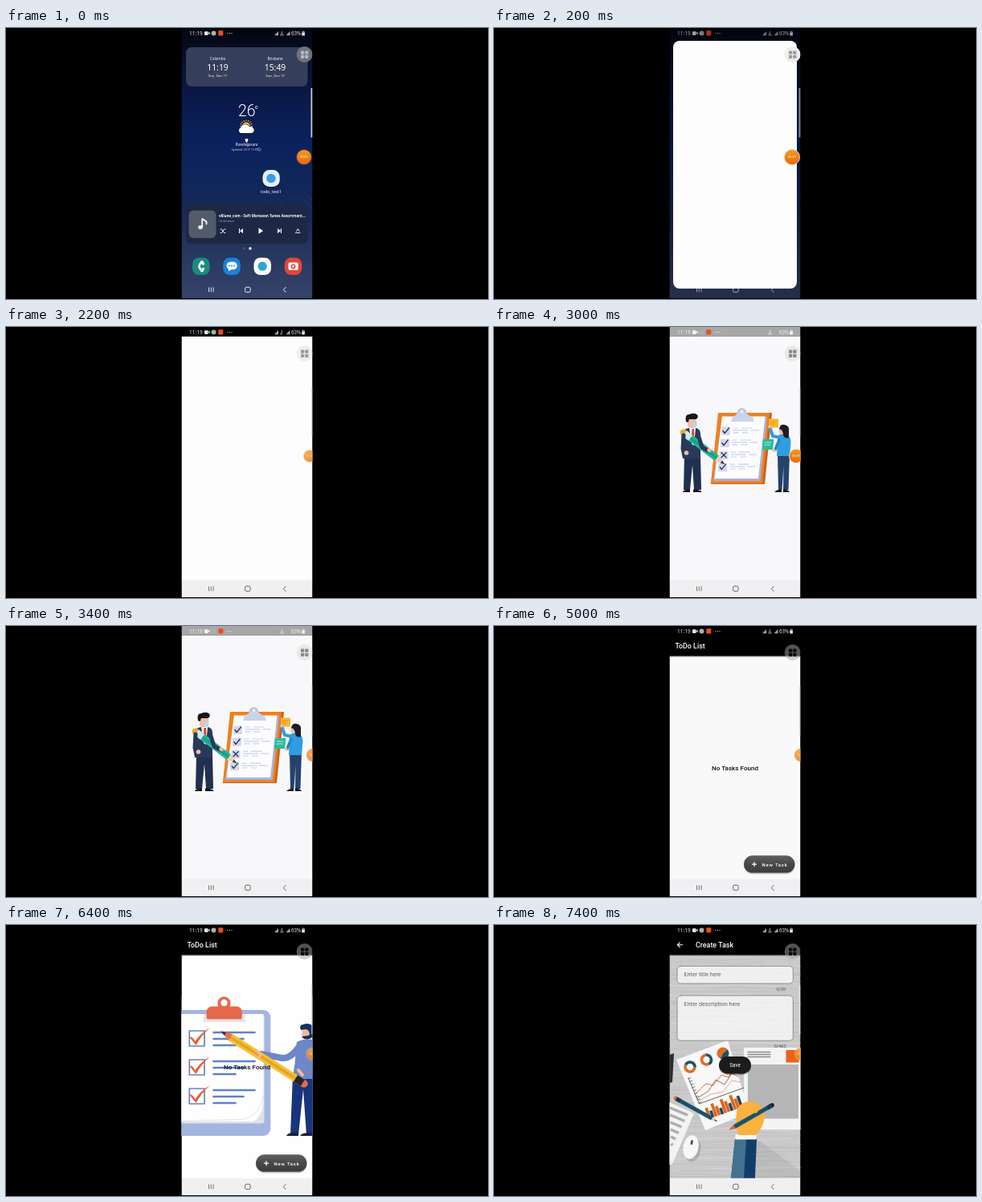
An HTML page with a canvas for the animation above (8000 ms loop, 600 px wide and 338 px high).

```html
<!DOCTYPE html>
<html lang="en">
<head>
<meta charset="utf-8">
<title>Todo app demo</title>
<style>
html, body { margin: 0; height: 100%; overflow: hidden; background: #000; }
canvas { display: block; width: 600px; height: 338px; }
</style>
</head>
<body>
<canvas id="stage"></canvas>
<script>
const canvas = document.getElementById('stage');
const dpr = window.devicePixelRatio || 1;
canvas.width = 600 * dpr;
canvas.height = 338 * dpr;
const c = canvas.getContext('2d');
const LEFT = 218.5, WIDTH = 163;

// Drawing helpers
function box(x, y, w, h, fill, r = 0, stroke, lw = 1) {
  c.beginPath();
  c.roundRect(x, y, w, h, r);
  if (fill) { c.fillStyle = fill; c.fill(); }
  if (stroke) { c.strokeStyle = stroke; c.lineWidth = lw; c.stroke(); }
}
function oval(x, y, rx, fill, ry = rx) {
  c.beginPath();
  c.ellipse(x, y, rx, ry, 0, 0, 7);
  c.fillStyle = fill;
  c.fill();
}
function shape(d, fill) { c.fillStyle = fill; c.fill(new Path2D(d)); }
function line(d, color, lw = 1, cap = 'round') {
  c.strokeStyle = color;
  c.lineWidth = lw;
  c.lineCap = cap;
  c.lineJoin = 'round';
  c.stroke(new Path2D(d));
}
function text(s, x, y, size, color = '#fff', { align = 'left', weight = 400, font = 'Roboto', gap = 0 } = {}) {
  c.font = `${weight} ${size}px ${font}, sans-serif`;
  c.textAlign = align;
  c.letterSpacing = gap + 'px';
  c.fillStyle = color;
  c.fillText(s, x, y);
}
function label(s, x, y, size, color, weight = 500) {
  text(s, x, y, size, color, { align: 'center', weight, font: 'Noto Sans' });
}
function vertical(y1, y2, ...colors) {
  const g = c.createLinearGradient(0, y1, 0, y2);
  colors.forEach((color, i) => g.addColorStop(i / (colors.length - 1), color));
  return g;
}
function at(x, y, angle, draw) {
  c.save();
  c.translate(x, y);
  c.rotate(angle);
  draw();
  c.restore();
}
// Tip at (x1, y1), blunt end at (x2, y2)
function pencil(x1, y1, x2, y2, w, body, cone, lead, end, band) {
  const len = Math.hypot(x2 - x1, y2 - y1), h = w / 2, n = w * 1.5;
  at(x1, y1, Math.atan2(y2 - y1, x2 - x1), () => {
    box(len - w, -h, w, w, end, [0, h, h, 0]);
    box(n, -h, len - n - w * .7, w, body);
    box(n, -h * .35, len - n - w * 1.8, h * .7, 'rgba(0,0,0,.13)');
    box(len - w * 1.8, -h, w * 1.1, w, band);
    shape(`M0 0L${n} ${-h}V${h}Z`, cone);
    shape(`M0 0L${n * .45} ${-h * .45}V${h * .45}Z`, lead);
  });
}

function statusBar(color, back, dimArrow) {
  if (back) box(LEFT, 0, WIDTH, 11.7, back);
  text('11:19', 228, 9, 6.5, color, { font: 'Noto Sans' });
  box(247, 4.2, 4.6, 4.7, color, 1);
  shape('M251.500 6.500L253.600 4.500V8.500Z', color);
  oval(258.5, 6.4, 3, '#a9b2ad');
  box(264.3, 3.3, 6, 6.2, '#ee4d1c', 1);
  [276, 278.5, 281].forEach(x => oval(x, 6.6, .6, color));
  [334, 348.5].forEach(x => shape(`M${x} 9.300L${x + 5} 4V9.300Z`, '#a2a2a2'));
  label('4', 343.5, 6.6, 4, color);
  line('M342.500 7.500V9.500', color, .8);
  line('M344.700 7.500V9.500', dimArrow ? '#555' : color, .8);
  text('63%', 355, 9, 6.2, color, { font: 'Noto Sans' });
  box(368.3, 5.6, 3.6, 4, color, .6);
  line('M369 5.600V4.200H371.200V5.600', color, .7);
}
function navBar(color, back) {
  if (back) box(LEFT, 315.7, WIDTH, 21.5, back);
  [252.5, 255.3, 258.1].forEach(x => line(`M${x} 323.500V329.300`, color, .9, 'butt'));
  box(297.6, 323.2, 6.6, 6.4, null, 2, color, 1);
  line('M348.200 323.500L345.300 326.500L348.200 329.500', color, 1);
}
function assist(back, squares) {
  oval(371.6, 33, 10, back);
  for (const x of [367, 372.2]) for (const y of [28.5, 33.7]) box(x, y, 4.2, 4.2, squares, .8);
}
function recorder(x, r, { alpha = 1, ring = '#ffd9a0' } = {}) {
  c.globalAlpha = alpha;
  oval(x, 161, r, ring);
  oval(x, 161, r - .8, vertical(152, 171, '#f29a24', '#e76612'));
  label('00:01', x, 162.4, 3.7, '#fbe3a0', 600);
  c.globalAlpha = 1;
}
function edgeHandle(color, w = 1.2) { box(381.5 - w, 75, w, 61.5, color, .6); }

function home() {
  box(LEFT, 0, WIDTH, 337, vertical(0, 337, '#03050f', '#0a1232', '#0a1a4c', '#0b215e', '#10265a', '#1a2c56', '#2a3961', '#36436a'));
  for (let i = 0; i < 45; i++) {
    const x = 381 - (i * 37.7 % 62), y = 207 + (i * 23.3 % 17) + (381 - x) * .1;
    box(x, y, .7, .7, 'rgba(150,165,170,.45)');
  }
  box(224, 24, 151.5, 49, '#353e5a', 7);
  for (const [city, time, x] of [['Colombo', '11:19', 263.5], ['Brisbane', '15:49', 335]]) {
    label(city, x, 39.7, 4.6);
    label(time, x, 52.7, 10.4);
    label('Sun, Dec 17', x, 61, 4.3);
  }
  text('26', 289, 110, 19.5, '#fff', { weight: 300 });
  text('°', 309, 108, 14, '#fff', { weight: 300 });
  for (let i = 0; i < 9; i++) at(299, 122.5, Math.PI * (1 + i / 8), () => line('M6.500 0H7.500', '#ffb52e', 1.1));
  oval(299, 122.5, 5, '#ffb020');
  const cloud = 'M292 131A3.600 3.600 0 0 1 292 124.500A6 6 0 0 1 303 123.500A4 4 0 0 1 306 131Z';
  line(cloud, '#0b1f58', 1.2);
  shape(cloud, '#fff');
  shape('M299.500 143.500C296.500 139.500 297.500 138 299.500 138S302.500 139.500 299.500 143.500Z', '#fff');
  label('Ruvelagasara', 299.5, 147.4, 4.4);
  label('Updated 12/17 11:01', 297, 153, 3.4, '#d5d9e6');
  line('M317 150.500A1.800 1.800 0 1 1 315.500 149.500', '#dde', .6);

  box(319.5, 177, 21.3, 21, '#e4f0fa', 8.5);
  oval(330, 187.5, 5.8, '#3f9ce0');
  label('todo_test1', 330, 205.8, 5.2);

  box(224, 220, 151.5, 49, '#1d2845', 6);
  box(227.5, 227.5, 34, 34.5, '#535b6b', 6);
  oval(242, 248.6, 2.8, '#fff', 2.4);
  line('M244.200 248.500V238L249.500 241.500V244.500', '#fff', 1.7);
  text('v8lune_com - Soft Monsoon Tunes Assortment…', 265, 235.8, 4.55, '#fff', { weight: 600, font: 'Noto Sans' });
  text('Unknown', 265, 241.5, 4.3, '#9ba5b8', { font: 'Noto Sans' });
  line('M267 251H268.500L271.500 255.500H273M267 255.500H268.500L271.500 251H273', '#fff', .9);
  shape('M295 250V256L291 253Z M290 250H291V256H290Z', '#fff');
  shape('M314.500 249.300L320 253L314.500 256.700Z', '#fff');
  shape('M338 250V256L342 253Z M342 250H343V256H342Z', '#fff');
  line('M360.500 255.500H366M361.500 253.500L363.300 250.500L365 253.500', '#fff', .9);

  oval(296, 275, 1.4, '#46557a');
  oval(304, 275, 1.7, '#fff');
  [[232, '#188c7b'], [270.3, '#1b82d6'], [308.5, '#fafafa'], [346.8, '#e0473a']]
    .forEach(([x, color]) => box(x, 286.5, 21.5, 21.5, color, 8));
  line('M244.500 291.500Q236.500 297 244.500 303', '#fff', 2.6);
  line('M243.500 292L245.500 294M243.500 302.500L245.500 300.500', '#fff', 3.2);
  box(274.6, 291.8, 13, 9.4, '#fff', 4.5);
  shape('M277 299V303.500L281.500 300.500Z', '#fff');
  [278, 281, 284].forEach(x => oval(x, 296.6, 1, '#1b82d6'));
  oval(319.2, 297.2, 5.6, '#2ba7c9');
  box(351.5, 292.5, 12.3, 9.6, '#fff', 2);
  oval(357.5, 297.4, 3, '#e0473a');
  oval(357.5, 297.4, 1.4, '#fff');

  statusBar('#e6e6e6');
  navBar('#f2f4f8');
  edgeHandle('#c5cad8', 2);
  assist('#6d737e', '#b3b8bf');
}

function blank(dimArrow) {
  box(LEFT, 11.5, WIDTH, 305, '#fdfdfd');
  statusBar('#e6e6e6', '#000', dimArrow);
  navBar('#666', '#f0eff1');
  edgeHandle('#cfcfcf');
  assist('#eeeeee', '#9b9b9b');
}

function opening() {
  home();
  box(LEFT, 0, WIDTH, 337, 'rgba(0,0,0,.3)');
  box(223, 16, 154, 309, '#fdfdfd', 8);
  assist('#eeeeee', '#9b9b9b');
}

function splash() {
  box(LEFT, 11.5, WIDTH, 305, '#f8f8fa');
  // Clipboard
  shape('M280 107H346L337 196H270Z', '#c8641a');
  shape('M279 107H343L334 195H270Z', '#f1801f');
  shape('M284 112H340L331.500 192H273Z', '#a9b1dd');
  shape('M284 111.500H337.500L329 189H274.500Z', '#fdfdff');
  oval(308.5, 107, 6, '#bcc8df');
  shape('M295 118L297 112Q302 110 303 107H314Q315 110 322 112L324 118Z', '#c9d4e8');
  oval(308.5, 105.5, 2, '#eef2fa');
  [[288.5, 129.5], [287.3, 144.5], [286, 159.7], [284.6, 174.7]].forEach(([x, y], i) => {
    box(x - 5.5, y - 5, 11, 10.5, '#d3d9ec', 1);
    line(i === 2 ? `M${x - 3} ${y - 3}L${x + 3} ${y + 3}M${x + 3} ${y - 3}L${x - 3} ${y + 3}`
      : `M${x - 3.5} ${y}L${x - 1.3} ${y + 3}L${x + 4} ${y - 3.5}`, '#29345f', 1.3);
    line(`M${x + 9} ${y - 3.5}h6m4 0h14M${x + 9} ${y - .6}h19m3 0h10M${x + 9} ${y + 2.3}h7m4 0h8`, '#c9d0ea', 1.2, 'butt');
  });
  // Man with pencil
  shape('M237 160H257L258 203H249L247 172L244 203H236Z', '#20304f');
  shape('M235 206Q236 202 244 202.500V206ZM248 206V202.500Q256 202 259 206Z', '#15181f');
  shape('M234 133Q236 127 243 126H251Q257 127 257 133V164H235L233 154Z', '#283959');
  shape('M243 126H251L249 148L246 146Z', '#fff');
  shape('M246.500 127H249L249.500 140L247.500 143L245.500 140Z', '#e2402f');
  box(241, 112, 11, 14, '#f4bd99', 4);
  shape('M244.500 118.500L252.500 118V123Q250 127 246 125Z', '#c6cedf');
  shape('M239 118Q237 109 243 109Q250 106 253.500 110Q254.500 114 251 115L243 115L241.500 119Z', '#131722');
  pencil(287.5, 171.5, 232.5, 129, 8.5, '#21b49b', '#f5cfa2', '#29345f', '#f2a534', '#d7e6e8');
  line('M236 135L235 152L238 157', '#283959', 5);
  line('M254 134L259 150L266 154', '#283959', 5);
  oval(239.5, 157, 2.8, '#f4bd99');
  oval(268, 153.5, 2.6, '#f4bd99');
  // Woman with notes
  box(342, 114.5, 12, 11, '#fbb52c');
  line('M344.500 118H351M344.500 121H349', '#e29417', .8);
  shape('M335 140H348.500L347 153H334Z', '#28bca0');
  line('M337 144H345M337 147H344', '#bff0e3', .9);
  shape('M353 158H368L366.500 203H360L360.500 173L358.500 203H354Z', '#24426c');
  shape('M349 206Q352 202.500 358 202.500V206ZM360 206V202.500Q366 202 368 206Z', '#15181f');
  line('M357 138L347 136L343.500 126', '#2f9de0', 4);
  oval(343, 124.5, 2, '#f4bd99');
  shape('M353 138Q354 133 361 133Q369 134 369.500 143L368 161H352Z', '#2f9de0');
  line('M355 141L350 153', '#2585c4', 3.5);
  oval(348.5, 154, 2, '#f4bd99');
  oval(358.5, 129, 4, '#f4bd99', 5);
  shape('M355 127Q356 121 362 122Q368 123 367 130L367 138Q362 140 360 135Q360 128 355 127Z', '#1a1d29');

  statusBar('#f4f4f4', '#a7a7a7');
  navBar('#666', '#f0eff1');
  edgeHandle('#dcdcdc');
  assist('#e9e9e9', '#8a8a8a');
}

function appBar(title, x) {
  box(LEFT, 37.5, WIDTH, 2, vertical(37.5, 39.5, 'rgba(0,0,0,.4)', 'rgba(0,0,0,0)'));
  box(LEFT, 0, WIDTH, 37.6, '#000');
  text(title, x, 28, 8.9, '#fff', { weight: 500 });
}

function clipboardArt() {
  box(LEFT, 89, WIDTH, 175, '#fefefe');
  box(208, 106, 121.3, 157, '#a4b5e0', 9);
  box(208, 111, 113.5, 136.5, '#dfe2ea', 3);
  shape('M208 111H318Q320.500 111 320.500 114V205Q322 238 308 245H208Z', '#fefefe');
  line('M320.500 212Q318 236 296 242.500L218 244.500', '#d9dce5', .8);
  box(246, 111, 51.5, 10, '#dfe3ec');
  c.beginPath();
  c.arc(271.5, 97.5, 8.2, 0, 7);
  c.roundRect(249.5, 101.5, 44.3, 16, [7, 7, 2, 2]);
  c.fillStyle = '#e7694b';
  c.fill();
  oval(271.5, 97, 4.3, '#fff');
  for (const y of [132, 168, 204]) {
    box(228.3, y, 18.7, 19, null, 0, '#6384c4', 1.7);
    shape(`M228.500 ${y + 8}Q231 ${y + 6} 235.500 ${y + 13}Q242 ${y + 3} 254 ${y - 4}Q243 ${y + 6} 236.500 ${y + 18}Z`, '#e6603c');
    [53, 39, 29].forEach((w, i) => line(`M258.500 ${y + 2 + i * 8}h${w - 2}`, '#6080c9', 2.6));
  }
  // Man holding the pencil
  shape('M357 187H382V262H374L370 205L364 262H354Z', '#17357b');
  shape('M349 263Q351 259 356 259.500L364 259V263ZM366 263Q369 259 374 259.500H382V263Z', '#18203c');
  shape('M362 146Q370 141 382 143V192H356Q361 170 360 160Z', '#6c88ca');
  line('M366 150Q355 167 344 166L318 161', '#6c88ca', 8);
  oval(374.5, 135, 6.5, '#f6b79b', 8);
  shape('M367 131Q364 125 370 124Q377 121 382 126V142L378 137Q378 131 373 130Z', '#182f63');
  shape('M368 139Q372 145 380 141V135L376 138Z', '#182f63');
  pencil(267.5, 132.5, 375, 200.5, 9.5, '#fbbf2f', '#e8704c', '#3a3030', '#e8694a', '#22232d');
  line('M311 157L317 161L315 166', '#f6b79b', 3.2);
  line('M364 181L369 187', '#f6b79b', 4);
}

function todoList(withArt, dimArrow) {
  box(LEFT, 37, WIDTH, 279, withArt ? '#fefefe' : '#f9f9fa');
  if (withArt) clipboardArt();
  text('No Tasks Found', 300, 179.5, 8.1, '#111', { align: 'center', weight: 500 });
  box(311, 288, 63.5, 21.5, 'rgba(0,0,0,.22)', 11);
  box(311, 286.3, 63.5, 21.5, vertical(286, 308, '#626262', '#484848', '#3c3c3c'), 10.8);
  line('M321 297.200H327M324 294.200V300.200', '#fff', 1.2, 'butt');
  text('New Task', 333.5, 299.5, 6, '#fff', { weight: 500, gap: .75 });
  appBar('ToDo List', 225.5);
  statusBar('#e6e6e6', null, dimArrow);
  navBar('#666', '#f0eff1');
  edgeHandle('#cfcfcf');
  assist('rgba(165,165,165,.5)', '#080808');
}

function deskArt() {
  box(LEFT, 37, WIDTH, 279, '#cacaca');
  for (let i = 0; i < 70; i++) {
    const y = 39 + i * 4, bend = 3 * Math.sin(i * 2.3), x = LEFT + (i * 53 % 90) - 30;
    line(`M${x} ${y}q35 ${bend} 70 0t60 ${bend / 2}`, i % 3 ? '#bebebe' : '#d8d8d8', .8);
  }
  for (let y = 62; y < 315; y += 36) line(`M${LEFT} ${y}h163`, '#b2b2b2', .8);
  shape('M218 162L224 160L222 196L218 197Z', '#2c2d31');
  // Browser window
  box(311, 153, 71, 102, '#f4f4f4');
  [158.5, 161.5, 164.5].forEach(y => line(`M315.500 ${y}h29`, '#8b8b8b', 1.3, 'butt'));
  box(316, 174, 63, 67.5, '#b5b5b5');
  box(363.5, 156, 16, 15.5, '#e8621a');
  // Report sheet
  shape('M227 168L291 144L318 234L263 256Z', '#f8f8f8');
  [[244, 177], [264.5, 168], [285, 160]].forEach(([x, y], i) => {
    [['#e46a22', 0, 3.6], ['#1d5468', 3.6, 6.3]].forEach(([color, from, to]) => {
      c.beginPath();
      c.arc(x, y, i === 2 ? 3.8 : 6, from + i, to + i);
      c.strokeStyle = color;
      c.lineWidth = i === 2 ? 7.4 : 3.6;
      c.lineCap = 'butt';
      c.stroke();
    });
  });
  line('M242 191L255.500 223L311 203', '#555', .9);
  for (let i = 0; i < 9; i++) line(`M${242 + i * 1.6} ${191.5 + i * 3.8}l3 -1`, '#555', .8);
  line('M251 210L264 198L273 200L283 187L292 190L300 174', '#e2733a', 1);
  line('M253 216L267 207L276 193L287 199L296 185L304 189', '#9a5a3a', .9);
  line('M255 219L270 211L285 208L296 194L307 196', '#e9a27c', .9);
  at(267, 242, -.34, () => [14, 9, 17, 12, 8, 18, 14, 10, 19, 13, 15]
    .forEach((h, i) => box(i * 4.2, -h, 3.7, h, i % 3 === 1 ? '#1d4b66' : '#e0661f')));
  // Keyboard and mouse
  shape('M218 221L249 235L222 298L218 299Z', '#f2f2f2');
  for (let i = 0; i < 6; i++) line(`M${219 + i * .3} ${228 + i * 9}l${22 - i * 4} ${9 - i * 1.5}`, '#adadad', 3.5, 'butt');
  at(245, 277, .2, () => {
    oval(3, 3, 10, 'rgba(0,0,0,.14)', 15);
    oval(0, 0, 9.5, '#f7f7f7', 15);
    box(-1.3, -9, 2.6, 6, '#444', 1.3);
  });
  pencil(278, 245, 224, 215, 5, '#1d5871', '#e9c9a0', '#222', '#e0661f', '#123a50');
  // Writing hand
  shape('M326 266L381 306V315H326Z', 'rgba(0,0,0,.07)');
  shape('M300 267H327L325 316H295Z', '#0f3f68');
  shape('M300 267H314L311 316H295Z', '#44718f');
  box(300.5, 261, 26, 6.5, '#f7f7f7', 1);
  shape('M304 262Q300 246 302 234Q304 221 318 220Q335 221 337 238Q336 252 326 262Z', '#fab13e');
  pencil(292.5, 255.5, 348.5, 223.5, 5.2, '#1d5871', '#e0661f', '#e0661f', '#222', '#123a50');
  line('M309 236Q318 230 326 232', '#fab13e', 5);
}

function createTask() {
  deskArt();
  for (const [y, h, hint] of [[51.3, 21.7, 'Enter title here'], [88, 56.2, 'Enter description here']]) {
    box(228, y, 144.3, h, 'rgba(255,255,255,.72)', 4.5, '#858585', .9);
    text(hint, 236.5, y + 13.1, 7.2, '#636363');
  }
  text('0/30', 363, 81.8, 5.5, '#555', { align: 'right' });
  text('0/400', 363.5, 153.3, 5.5, '#555', { align: 'right' });
  box(280, 165.5, 40, 21.5, 'rgba(0,0,0,.3)', 10.7);
  box(280, 164, 40, 21.5, '#1c1c1d', 10.7);
  text('Save', 300, 177, 6.3, '#fff', { align: 'center' });
  appBar('Create Task', 251);
  line('M234.500 24.700H228.500M231.300 21.800L228.400 24.700L231.300 27.600', '#fff', 1.1);
  statusBar('#e6e6e6');
  navBar('#666', '#f0eff1');
  edgeHandle('#e4e4e4', 1.8);
  assist('rgba(165,165,165,.5)', '#0c0c0c');
}

function render(t) {
  c.setTransform(dpr, 0, 0, dpr, 0, 0);
  c.fillStyle = '#000';
  c.fillRect(0, 0, 600, 338);
  c.save();
  c.beginPath();
  c.rect(LEFT, 0, WIDTH, 337.2);
  c.clip();
  if (t < 200) home();
  else if (t < 400) opening();
  else if (t < 3000) blank(t >= 2200);
  else if (t < 5000) splash();
  else if (t < 7200) todoList(t >= 5200, t >= 5400 && t < 6400);
  else createTask();

  const faded = { alpha: .62, ring: '#f3b774' };
  if (t < 200) recorder(371, 9.5, { ring: '#b9530f' });
  else if (t < 800) recorder(371, 10);
  else if (t < 1000) recorder(373.5, 9);
  else if (t < 1200) recorder(378, 8);
  else if (t < 3000) recorder(378, 8, faded);
  else if (t < 3400) recorder(376, 9);
  else recorder(382, 8.5, faded);
  c.restore();
}

function tick() {
  render(performance.now() % 8000);
  requestAnimationFrame(tick);
}
tick();
</script>
</body>
</html>
```
